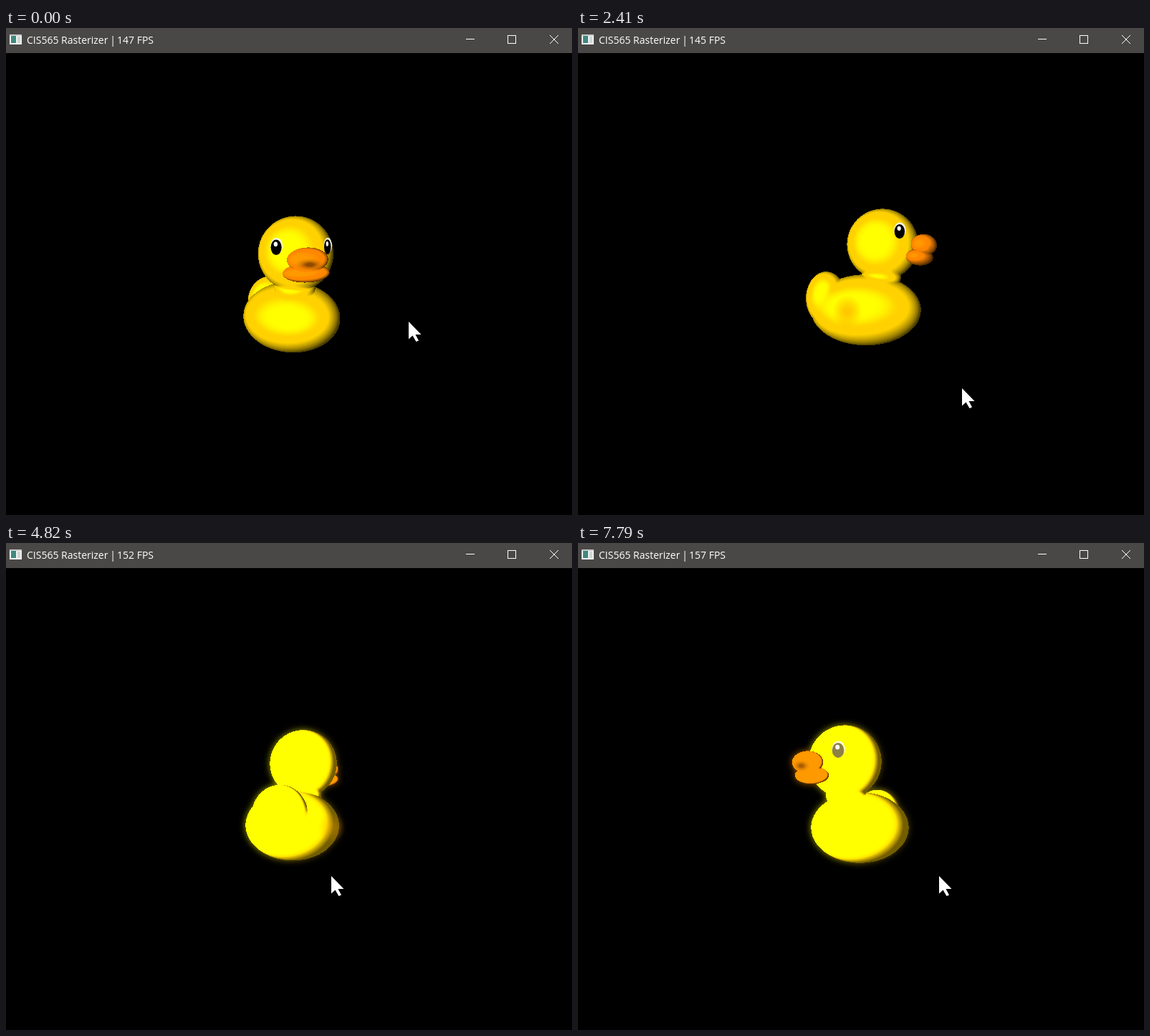
Recreate the animation shown at these times as an HTML page with a canvas. Size 790 by 680 pixels, loop 8 s.

```html
<!DOCTYPE html>
<html lang="en">
<head>
<meta charset="utf-8">
<title>CIS565 Rasterizer</title>
<style>
  html, body { margin: 0; width: 100%; height: 100%; overflow: hidden; background: #000; }
  canvas { display: block; }
</style>
</head>
<body>
<canvas id="stage" width="790" height="680"></canvas>
<script>
const LOOP = 8000, BLOOM_AT = 4020;
const OX = 270, OY = 235, W = 250, H = 270;
const stage = document.getElementById('stage').getContext('2d');
const layer = document.createElement('canvas');
layer.width = W;
layer.height = H;
const duck = layer.getContext('2d');
const image = duck.createImageData(W, H);

// time, yaw, pitch, cursor x, cursor y
const DRAG = [
  [0, 33, 8, 562, 410], [50, 33, 6, 567, 409], [210, 33, 3, 571, 411], [390, 33, 3, 571, 411],
  [850, 9, 27, 601, 442], [1200, 9, 27, 600, 446], [1780, 122, -6, 502, 448],
  [2050, 122, -6, 505, 539], [2830, 50, -2, 571, 462], [3160, 19, 2, 685, 460],
  [4020, 19, 2, 685, 460], [4820, 160, -3, 454, 465], [5980, 172, -3, 512, 470],
  [6450, 95, -2, 588, 444], [7150, -40, 0, 631, 440], [7320, -40, 0, 631, 440],
  [7790, -32, 0, 504, 465]
];
const FPS = [147, 159, 153, 145, 156, 152, 138, 151, 157];

const RAD = Math.PI / 180;
const clamp = (v, a = 0, b = 1) => Math.min(b, Math.max(a, v));
const smooth = (a, b, v) => { const k = clamp((v - a) / (b - a)); return k * k * (3 - 2 * k); };
const dot = (a, b) => a[0] * b[0] + a[1] * b[1] + a[2] * b[2];

// Model axes: right, down, forward. The head is turned a little on the body.
const TURN = -20, HEAD_R = 49, HEAD = [-10, -45, 28];
const YELLOW = { tint: 0.82, gloss: 46 }, ORANGE = { tint: 0.53, gloss: 18 };

function onHead([x, y, z]) {
  const s = Math.sin(TURN * RAD), c = Math.cos(TURN * RAD);
  return [HEAD[0] + z * s + x * c, HEAD[1] + y, HEAD[2] + z * c - x * s];
}

const PARTS = [
  { at: [-1, 45, 5], size: [64, 49, 76], turn: 0, skin: YELLOW },
  { at: [-4, 29, -50], size: [36, 37, 28], turn: 0, skin: YELLOW },
  { at: [-10, 0, 26], size: [27, 20, 27], turn: 0, skin: YELLOW },
  { at: HEAD, size: [HEAD_R, HEAD_R, HEAD_R], turn: TURN, skin: YELLOW },
  { at: onHead([0, 4, 57]), size: [24, 14, 16], turn: TURN, skin: ORANGE },
  { at: onHead([0, 20, 51]), size: [28, 11, 16], turn: TURN, skin: ORANGE }
];

function stateAt(t) {
  let i = 0;
  while (i < DRAG.length - 2 && t >= DRAG[i + 1][0]) i++;
  const a = DRAG[i], b = DRAG[i + 1], k = clamp((t - a[0]) / (b[0] - a[0]));
  const [, yaw, pitch, x, y] = a.map((v, n) => v + (b[n] - v) * k);
  return { yaw, pitch, x, y };
}

function axes(yaw, pitch) {
  const s = Math.sin(yaw * RAD), c = Math.cos(yaw * RAD);
  const sp = Math.sin(pitch * RAD), cp = Math.cos(pitch * RAD);
  return [[c, 0, s], [-s * sp, cp, c * sp], [-s * cp, -sp, c * cp]];
}

function project(state, point) {
  const [x, y, z] = axes(state.yaw, state.pitch).map(row => dot(row, point));
  const scale = 1 / (1 - z / 500);
  return { x: 397 + x * scale, y: 352 + 0.85 * state.pitch + y * scale, z, scale };
}

// Turned ellipsoid as a quadratic form in view space
function toBlob(state, { at, size, turn, skin }) {
  const place = project(state, at), rows = axes(state.yaw + turn, state.pitch);
  const form = rows.map(a => rows.map(b =>
    a.reduce((sum, v, i) => sum + v * b[i] / (size[i] * place.scale) ** 2, 0)));
  return { ...place, form, skin, reach: Math.max(...size) * place.scale };
}

function drawSkin(state, bloom) {
  const px = image.data, blobs = PARTS.map(part => toBlob(state, part));
  const [lx, ly, lz] = bloom ? [-0.4, -0.1, 0.91] : [-0.23, -0.1, 0.968];
  const lit = [], depth = [];
  px.fill(0);
  for (let y = 0, o = 0; y < H; y++) {
    for (let x = 0; x < W; x++, o += 4) {
      let count = 0, near = -1e9, skin = null;
      for (const b of blobs) {
        const dx = x + OX + 0.5 - b.x, dy = y + OY + 0.5 - b.y;
        if (Math.abs(dx) > b.reach || Math.abs(dy) > b.reach) continue;
        const [p, q, r] = b.form;
        const half = r[0] * dx + r[1] * dy;
        const rest = p[0] * dx * dx + 2 * p[1] * dx * dy + q[1] * dy * dy - 1;
        const root = half * half - r[2] * rest;
        if (root < 0) continue;
        const dz = (Math.sqrt(root) - half) / r[2];
        const nx = p[0] * dx + p[1] * dy + p[2] * dz;
        const ny = q[0] * dx + q[1] * dy + q[2] * dz;
        const nz = half + r[2] * dz;
        lit[count] = (nx * lx + ny * ly + nz * lz) / Math.hypot(nx, ny, nz);
        depth[count] = b.z + dz;
        if (depth[count] > near) {
          near = depth[count];
          skin = b.skin;
        }
        count++;
      }
      if (!count) continue;
      let sum = 0, d = 0;
      for (let i = 0; i < count; i++) {
        const w = Math.exp((depth[i] - near) / 4);
        sum += w;
        d += w * lit[i];
      }
      d = Math.max(0, d / sum);
      const red = 255 * clamp(bloom ? 0.45 + 2.5 * d : 0.3 + 1.35 * d);
      px[o] = red;
      px[o + 1] = red * skin.tint + skin.gloss * (bloom ? smooth(0.1, 0.35, d) : smooth(0.7, 0.95, d));
      px[o + 3] = 255;
    }
  }
  duck.putImageData(image, 0, 0);
}

function oval(x, y, rx, ry, color) {
  duck.beginPath();
  duck.ellipse(x, y, rx, ry, 0, 0, 2 * Math.PI);
  duck.fillStyle = color;
  duck.fill();
}

function drawEyes(state, bloom) {
  const head = project(state, HEAD), r = HEAD_R * head.scale;
  duck.save();
  duck.beginPath();
  duck.arc(head.x, head.y, r, 0, 2 * Math.PI);
  duck.clip();
  for (const side of [-32, 32]) {
    const { x, y, z, scale } = project(state, onHead([side, -10, 33]));
    const facing = (z - head.z) / HEAD_R;
    if (facing < 0.1) continue;
    const rx = 7.8 * scale * facing, ry = 9.6 * scale;
    oval(x + 0.5, y - 1.5, rx + 1, ry, bloom ? '#fffbd0' : '#f4f4e4');
    oval(x, y + 0.5, rx, ry - 0.5, bloom ? '#8f8046' : '#000');
    oval(x - rx * 0.1, y - ry * 0.35, rx * 0.36, ry * 0.3, '#fff');
  }
  duck.restore();
}

// Soft patch on the surface that fades as it turns away
function drawPatch(state, point, rx, ry, color, strength) {
  const { x, y, scale } = project(state, point);
  const fill = duck.createRadialGradient(0, 0, 0.2, 0, 0, 1);
  fill.addColorStop(0, color);
  fill.addColorStop(1, 'rgba(255,150,0,0)');
  duck.save();
  duck.globalAlpha = clamp(strength);
  duck.translate(x, y);
  duck.scale(rx * scale, ry * scale);
  oval(0, 0, 1, 1, fill);
  duck.restore();
}

function drawDuck(state, bloom) {
  const front = Math.cos((state.yaw + TURN) * RAD);
  const wing = [-62, 46, -17];
  drawSkin(state, bloom);
  duck.save();
  duck.translate(-OX, -OY);
  drawPatch(state, wing, 18, 20, 'rgba(255,165,0,.6)', (project(state, wing).z - 20) / 40);
  drawEyes(state, bloom);
  drawPatch(state, onHead([0, 9, 66]), 19 * Math.abs(front), 8, '#7c3c00',
    0.85 * smooth(0.2, 0.8, front) - Math.max(0, state.pitch - 8) / 30);
  duck.restore();
  if (bloom) {
    stage.save();
    stage.globalAlpha = 0.65;
    stage.filter = 'blur(5px)';
    stage.drawImage(layer, OX, OY);
    stage.restore();
  }
  stage.drawImage(layer, OX, OY);
}

function drawCursor({ x, y }) {
  const arrow = [[0, 0], [0, 24.5], [5.5, 19.5], [10.5, 28], [14, 26.5], [9.5, 18], [17.5, 18]];
  stage.beginPath();
  for (const [dx, dy] of arrow) stage.lineTo(Math.round(x) + dx, Math.round(y) + dy);
  stage.closePath();
  stage.fillStyle = '#fff';
  stage.fill();
}

function box(x, y, w, h, color) {
  stage.fillStyle = color;
  stage.fillRect(x, y, w, h);
}

function drawTitleBar(t) {
  box(0, 0, 790, 35, '#4a4846');
  box(5, 9, 17, 14, '#f2f2f2');
  box(5, 9, 17, 2, '#c4c8ca');
  box(7, 11, 7, 10, '#3f8a80');
  box(16, 12, 4, 9, '#cfd6d6');

  stage.font = '14px "Open Sans", "Noto Sans", sans-serif';
  stage.fillStyle = '#fff';
  stage.textAlign = 'left';
  stage.fillText('CIS565 Rasterizer', 29, 22);
  stage.fillText(FPS[Math.floor((t + 610) / 1000)] + ' FPS', 155, 22);
  stage.textAlign = 'center';
  stage.fillText('|', 149, 22);

  box(642, 15, 12, 1, '#fff');
  stage.strokeStyle = '#fff';
  stage.lineWidth = 1;
  stage.strokeRect(700.5, 10.5, 11, 11);
  stage.beginPath();
  stage.moveTo(759, 10);
  stage.lineTo(771, 22);
  stage.moveTo(771, 10);
  stage.lineTo(759, 22);
  stage.stroke();
}

function frame() {
  const t = performance.now() % LOOP, state = stateAt(t);
  box(0, 0, 790, 680, '#000');
  drawDuck(state, t >= BLOOM_AT);
  drawTitleBar(t);
  drawCursor(state);
  requestAnimationFrame(frame);
}
frame();
</script>
</body>
</html>
```
